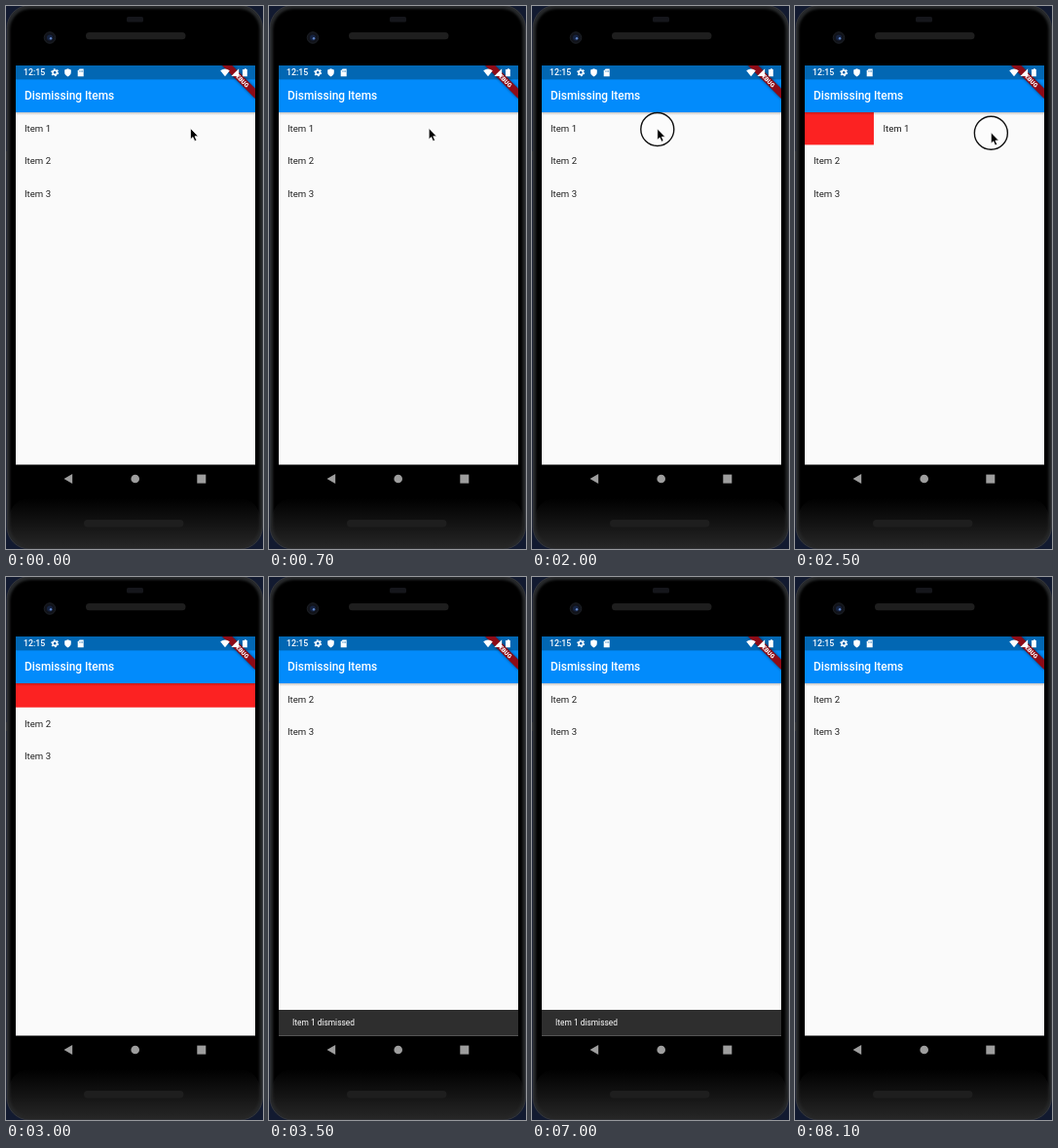
An HTML page for the animation above (8.2 s loop, 264 px wide and 557 px high).

```html
<!DOCTYPE html>
<html lang="en">
<head>
<meta charset="utf-8">
<title>Dismissing Items</title>
<style>
html, body { margin: 0; width: 100%; height: 100%; overflow: hidden; background: #10141f; }
svg { display: block; width: 264px; height: 557px; font-family: Roboto, sans-serif; }
.item { font-size: 9.6px; fill: #202020; }
</style>
</head>
<body>
<svg viewBox="0 0 264 557">
  <defs>
    <linearGradient id="glow" x2="0" y2="1">
      <stop offset="0" stop-color="#262626" stop-opacity="0"/><stop offset="1" stop-color="#262626"/>
    </linearGradient>
    <linearGradient id="shade" x2="0" y2="1">
      <stop offset="0" stop-color="#000" stop-opacity=".22"/><stop offset="1" stop-color="#000" stop-opacity="0"/>
    </linearGradient>
    <clipPath id="screen"><rect x="10" y="61" width="246" height="409.5"/></clipPath>
    <filter id="soft" x="-20%" y="-80%" width="140%" height="260%"><feGaussianBlur stdDeviation="1.6"/></filter>
    <filter id="edge"><feGaussianBlur stdDeviation="1"/></filter>
  </defs>

  <!-- phone -->
  <rect width="264" height="557" fill="#121a30"/>
  <path d="M0 149h2v9h-2z" fill="#292c30"/>
  <rect x="1" y="-.5" width="262.5" height="557.5" rx="23" fill="#26282a" stroke="#3a3c3f" stroke-width=".8"/>
  <rect x="4" y="3" width="256.5" height="551" rx="21" fill="#000" filter="url(#edge)"/>
  <rect x="3" y="505" width="258" height="51" rx="21" fill="url(#glow)"/>
  <rect x="124" y="11" width="17" height="5.5" rx="1.5" fill="#15161b"/>
  <g fill="#1e1e1e">
    <rect x="82" y="27" width="102.5" height="7.3" rx="3.6"/>
    <rect x="80" y="527" width="102.5" height="7.5" rx="3.7"/>
  </g>
  <circle cx="45" cy="32.5" r="5.8" fill="#11131a" stroke="#23262d" stroke-width=".8"/>
  <circle cx="45" cy="32.5" r="3" fill="#162340"/>
  <circle cx="46" cy="33.2" r="1.2" fill="#5f83c4"/>
  <g fill="#9e9e9e">
    <path d="M59.5 485l8.7-5v10z"/>
    <circle cx="132.7" cy="485" r="4.3"/>
    <rect x="196.3" y="480.6" width="9" height="9"/>
  </g>

  <g clip-path="url(#screen)">
    <rect x="9" y="61" width="248" height="410" fill="#fafafa"/>
    <rect id="red" x="9.5" y="109" width="0" height="33.4" fill="#fc2222"/>
    <text id="item1" class="item" y="129">Item 1</text>
    <g id="rest">
      <text class="item" x="19" y="162.4">Item 2</text>
      <text class="item" x="19" y="195.8">Item 3</text>
    </g>
    <g id="snack">
      <rect x="9" y="444" width="248" height="28" fill="#2e2e2e"/>
      <text x="24" y="460.3" font-size="8.4" fill="#fff">Item 1 dismissed</text>
    </g>

    <!-- bars -->
    <rect x="9" y="109" width="248" height="3" fill="url(#shade)"/>
    <rect x="9" y="61" width="248" height="48" fill="#028bfb"/>
    <rect x="9" y="61" width="248" height="14.4" fill="#0267b3"/>
    <text x="19" y="96.2" font-size="11.9" font-weight="500" fill="#fff">Dismissing Items</text>
    <g transform="translate(256 61) rotate(45)">
      <rect x="-24" y="16.8" width="48" height="7.2" fill="#000" opacity=".6" filter="url(#soft)"/>
      <rect x="-24" y="16.8" width="48" height="7.2" fill="#8d0b17"/>
      <text y="22.6" font-size="6.1" font-weight="900" fill="#fff" text-anchor="middle">DEBUG</text>
    </g>
    <g fill="#fff">
      <text x="18" y="71.4" font-size="8.8" font-weight="500">12:15</text>
      <circle cx="50.2" cy="68.2" r="2.2" fill="none" stroke="#fff" stroke-width="1.6"/>
      <circle cx="50.2" cy="68.2" r="3.4" fill="none" stroke="#fff" stroke-width="1.2" stroke-dasharray="1.78"/>
      <path d="M63.5 64.2l3.3 1.4v2.5q0 3-3.3 4.3q-3.3-1.3-3.3-4.3v-2.5z"/>
      <path d="M75.6 64.5h4.1v7.8h-6v-5.8z"/>
      <path d="M75.8 66.2v1.5M77.2 66.2v1.5M78.6 66.2v1.5" stroke="#0267b3" stroke-width=".6"/>
      <path d="M220.2 66.2q4.8-3.6 9.6 0l-4.8 6z"/>
      <path d="M239.2 64.3v7.8h-7.8z"/>
      <path d="M244 65h1v-.8h1.8v.8h1v7.3H243V65z"/>
    </g>
  </g>

  <g id="pointer">
    <circle id="ring" r="17" fill="#fff" fill-opacity=".35" stroke="#111" stroke-width="1.4"/>
    <path d="M0 -.6v11.4l2.5-2.3 1.8 4.1 2-.9-1.8-4h3.5z" fill="#000" stroke="#fff" stroke-width=".7"/>
  </g>
</svg>
<script>
const LOOP = 8200, STEP = 100, WIDTH = 246.5, ROW = 33.4;
const get = id => document.getElementById(id);
const red = get("red"), item1 = get("item1"), rest = get("rest");
const snack = get("snack"), pointer = get("pointer"), ring = get("ring");

const part = (t, a, b) => Math.min(1, Math.max(0, (t - a) / (b - a)));
const smooth = p => p * p * (3 - 2 * p);
const mix = (a, b, p) => a + (b - a) * p;
const show = (el, on) => el.setAttribute("display", on ? "inline" : "none");
const move = (el, x, y) => el.setAttribute("transform", `translate(${x} ${y})`);

function draw(t) {
  // pointer: glide left, press, drag right, release
  const glide = smooth(part(t, 300, 1300));
  const drag = smooth(part(t, 1800, 2800));
  const travel = 106.7 * drag;
  move(pointer, mix(189.5, 117.7, glide) + travel, mix(126, 131.5, drag));
  show(pointer, t < 3000);
  show(ring, t >= 1700 && t < 2700);

  // the row follows after a small slop, then flies out and collapses
  const held = Math.max(0, travel - 12.2);
  const offset = mix(held, WIDTH, part(t, 2600, 2900));
  const fold = smooth(part(t, 2900, 3200));
  red.setAttribute("width", offset);
  red.setAttribute("height", ROW * (1 - fold));
  item1.setAttribute("x", 19 + offset);
  move(rest, 0, -ROW * fold);

  const rise = 1 - (1 - part(t, 3150, 3400)) ** 3;
  const fall = part(t, 7400, 7650) ** 3;
  move(snack, 0, 28 * (1 - rise + fall));
}

function frame() {
  const t = performance.now() % LOOP;
  draw(Math.floor(t / STEP) * STEP);
  requestAnimationFrame(frame);
}
frame();
</script>
</body>
</html>
```
